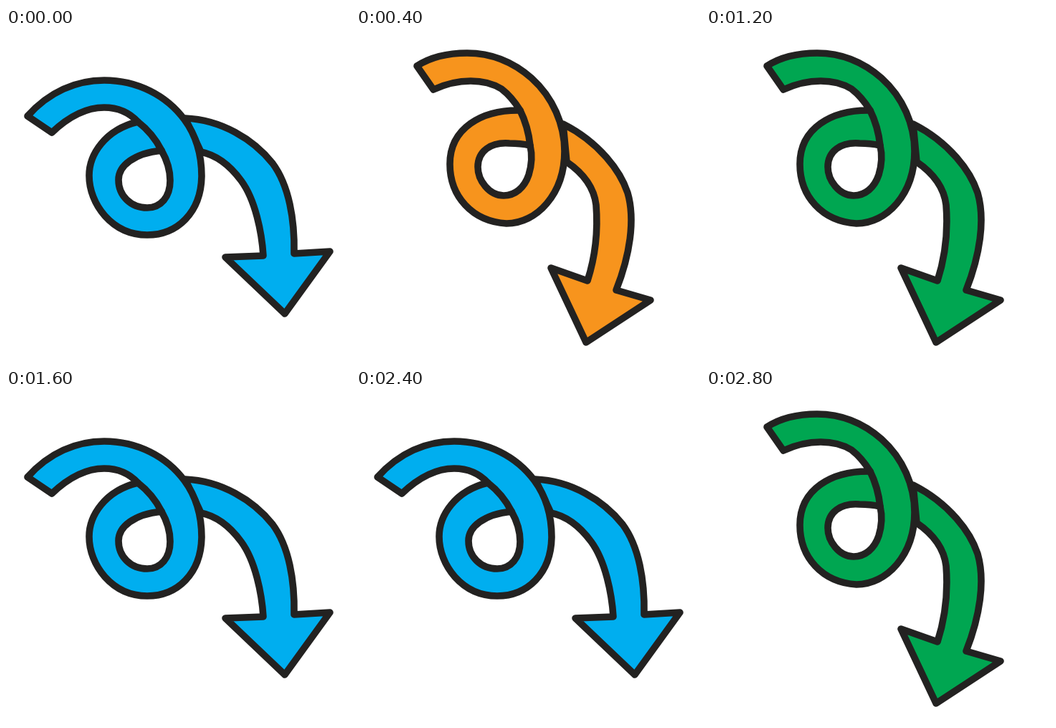
Animation, 480 px wide and 465 px high, one loop 3200 ms. Source, as an HTML page:

```html
<!DOCTYPE html>
<html lang="en">
<head>
<meta charset="utf-8">
<title>Looping arrow</title>
<style>
  html, body { margin: 0; width: 100%; height: 100%; overflow: hidden; background: #fff; }
  svg { display: block; width: 100%; height: 100%; }
  path { stroke: #232221; stroke-width: 9.6; stroke-linejoin: round; stroke-linecap: round; }
  .edge { fill: none; }
</style>
</head>
<body>
<svg viewBox="0 0 480 465">
  <g id="wide">
    <path d="M250 126 C300 128 345 155 372 189 C395 220 403 268 402 315 L452 312 L389 399 L306 320 L359 318
             C357 286 348 240 328 213 C314 194 297 178 272 173 Z"/>
    <path fill-rule="evenodd" d="M64 146 L30 123 C60 89 98 73 137 73 C183 73 224 94 249 128
             C266 151 273 178 273 207 C272 258 239 289 197 289 C148 289 116 246 116 206
             C116 177 138 142 184 131 C172 118 156 111 137 111 C111 111 86 125 64 146 Z
             M217 171 C225 185 229 198 229 213 C229 236 216 251 197 251
             C174 251 157 234 157 212 C157 192 179 175 217 171 Z"/>
    <path class="edge" d="M184 131 C197 141 209 155 217 171"/>
  </g>
  <g id="steep">
    <path d="M289 134 C340 160 369 200 379 230 C390 268 382 318 363 366 L411 380 L321 439 L272 335 L323 353
             C333 322 338 285 335 247 C332 222 316 202 294 187 Z"/>
    <path fill-rule="evenodd" d="M108 86 L85 53 C105 40 130 35 155 35 C190 35 220 48 245 70
             C275 97 291 135 291 172 C291 232 252 273 210 273 C162 270 131 235 131 190
             C131 140 175 114 229 115 C221 102 212 92 203 85 C190 77 177 74 160 74 C141 74 123 79 108 86 Z
             M243 164 C246 177 245 192 241 205 C235 223 222 234 206 234
             C186 234 170 213 170 194 C170 172 188 159 214 161 C225 161 234 162 243 164 Z"/>
    <path class="edge" d="M229 115 C236 129 241 146 243 164"/>
  </g>
</svg>
<script>
  const STEP = 400;
  const steps = [
    ['wide', '#00aeef'],
    ['steep', '#f7941d'],
    ['wide', '#00aeef'],
    ['steep', '#00a651'],
  ];
  const poses = document.querySelectorAll('g');
  const start = performance.now();

  function draw(now) {
    const index = Math.floor(Math.max(0, now - start) / STEP) % steps.length;
    const [pose, color] = steps[index];
    for (const group of poses) {
      group.style.display = group.id === pose ? '' : 'none';
      group.style.fill = color;
    }
    requestAnimationFrame(draw);
  }
  draw(start);
</script>
</body>
</html>
```
